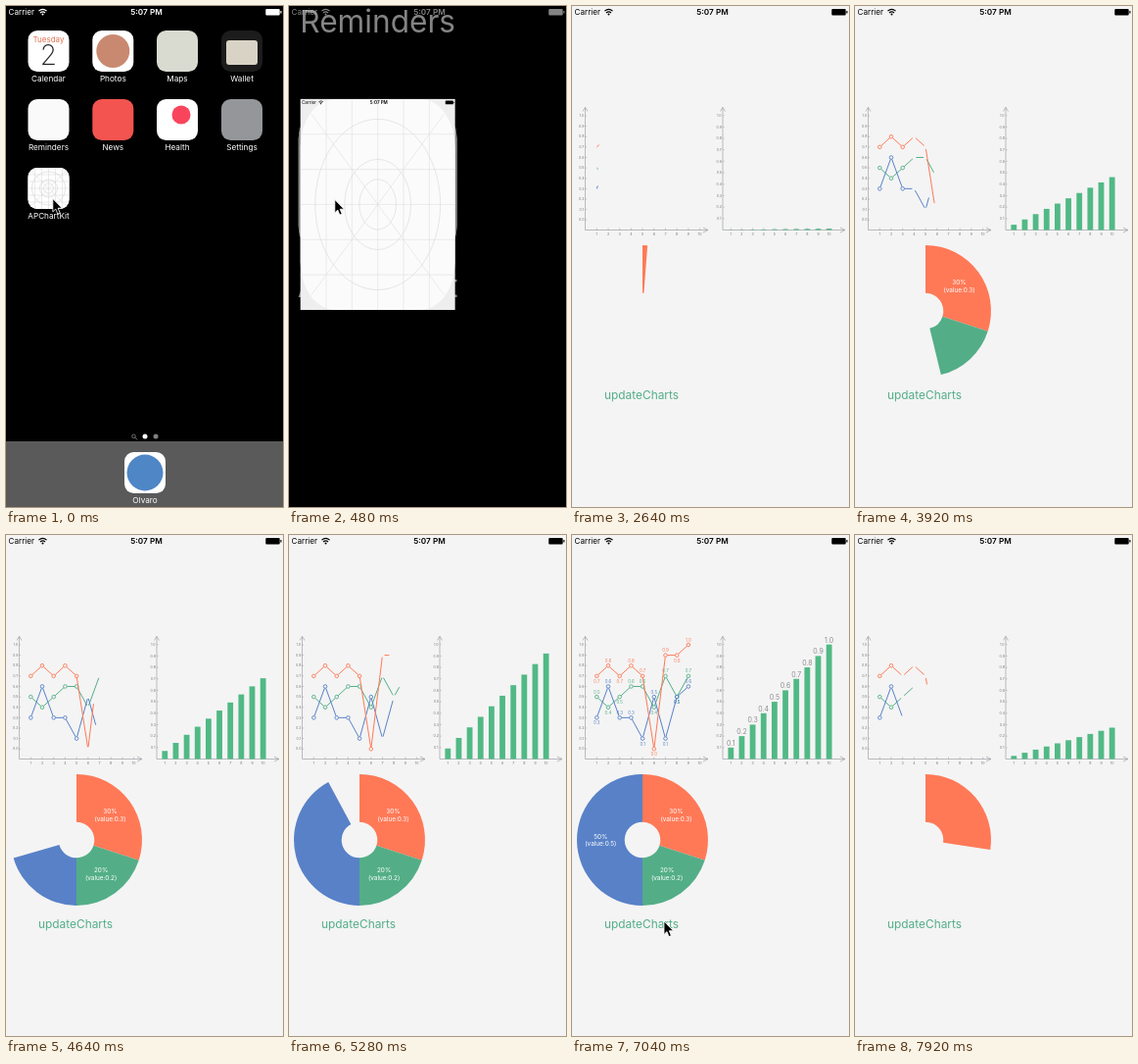
These frames come from a looping animation (283 by 511 pixels, 8 s). An HTML page:

```html
<!DOCTYPE html>
<html lang="en">
<head>
<meta charset="utf-8">
<title>Chart demo</title>
<style>
html, body { margin: 0; width: 100%; height: 100%; overflow: hidden; background: #000; }
svg { display: block; width: 283px; height: 511px; }
text { font-family: Inter, Roboto, sans-serif; }
</style>
</head>
<body>
<svg id="stage" viewBox="0 0 283 511"></svg>
<script>
const LOOP = 8000;
const ORANGE = '#ff7957', GREEN = '#53ae87', BLUE = '#5881c8', BAR = '#51b985', BG = '#f4f4f4';
const stage = document.getElementById('stage');

function el(tag, attrs, parent, content) {
  const node = document.createElementNS('http://www.w3.org/2000/svg', tag);
  set(node, attrs);
  if (content !== undefined) node.textContent = content;
  parent.appendChild(node);
  return node;
}
function set(node, attrs) {
  for (const k in attrs) node.setAttribute(k, attrs[k]);
}
const group = parent => el('g', {}, parent);
const label = (parent, x, y, size, fill, str, more = {}) =>
  el('text', { x, y, 'font-size': size, fill, 'text-anchor': 'middle', ...more }, parent, str);
const rect = (parent, x, y, width, height, fill, rx = 0) =>
  el('rect', { x, y, width, height, fill, rx }, parent);
const dot = (parent, cx, cy, r, fill) => el('circle', { cx, cy, r, fill }, parent);
const line = (parent, d, stroke, width = 0.6) =>
  el('path', { d, stroke, fill: 'none', 'stroke-width': width }, parent);

function statusBar(parent, color) {
  const g = group(parent);
  label(g, 2.5, 9, 8.1, color, 'Carrier', { 'text-anchor': 'start' });
  line(g, 'M33.4 5.2Q37.5 1.4 41.6 5.2M35 7Q37.5 4.7 40 7', color, 1.1);
  dot(g, 37.5, 8.6, 1, color);
  label(g, 143.5, 9, 8.2, color, '5:07 PM', { 'font-weight': 600 });
  rect(g, 265.3, 3, 14.4, 6.6, color, 1);
  rect(g, 280.3, 5, 1.2, 2.6, color, 0.5);
  return g;
}

// 42 x 42 template icon with construction lines
function gridIcon(parent) {
  const g = group(parent);
  rect(g, 0, 0, 42, 42, '#fff', 9.5);
  let d = 'M3 3L39 39M39 3L3 39';
  for (const v of [7, 14, 21, 28, 35]) d += `M${v} 0V42M0 ${v}H42`;
  set(line(g, d, '#dcdcdc'), { 'vector-effect': 'non-scaling-stroke' });
  for (const r of [5, 9, 17]) {
    el('circle', { cx: 21, cy: 21, r, fill: 'none', stroke: '#d2d2d2', 'stroke-width': 0.6,
      'vector-effect': 'non-scaling-stroke' }, g);
  }
  return g;
}

// Home screen
rect(stage, 0, 0, 283, 511, '#000');
const home = group(stage);
const homeBar = statusBar(stage, '#fff');
rect(home, 0, 444, 283, 67, '#5a5a5a');

function app(x, y, name, fill) {
  const g = group(home);
  rect(g, x, y, 42, 42, fill, 9.5);
  label(home, x + 21, y + 51.5, 8.2, '#fff', name);
  return g;
}
const COLS = [22.5, 88.3, 154, 220];
const calendar = app(COLS[0], 25, 'Calendar', '#fff');
label(calendar, 43.5, 36.5, 8, '#e0714f', 'Tuesday');
label(calendar, 43.5, 60, 28, '#222', '2', { 'font-weight': 200 });
dot(app(COLS[1], 25, 'Photos', '#fff'), 109.3, 46, 17, '#c98970');
app(COLS[2], 25, 'Maps', '#d9dbd0');
const wallet = app(COLS[3], 25, 'Wallet', '#1c1c1c');
rect(wallet, 225, 35, 32, 25, '#d8d3c4', 3);
app(COLS[0], 95, 'Reminders', '#fafafa');
app(COLS[1], 95, 'News', '#f3544f');
dot(app(COLS[2], 95, 'Health', '#fff'), 179, 111, 9.5, '#f9455c');
app(COLS[3], 95, 'Settings', '#94969a');
const launcher = app(COLS[0], 165, 'APChartKit', '#fff');
set(gridIcon(launcher), { transform: 'translate(22.5 165)' });
dot(app(121, 455, 'Olvaro', '#fff'), 142, 476, 18.5, '#4f86c6');
el('circle', { cx: 130.5, cy: 438.8, r: 1.8, fill: 'none', stroke: '#8a8a8a', 'stroke-width': 0.8 }, home);
line(home, 'M131.8 440.1L134 442.3', '#8a8a8a', 0.9);
dot(home, 142, 439, 2.5, '#fff');
dot(home, 153, 439, 2.5, '#808080');

// Launching window
const win = group(stage);
const winBg = rect(win, 0, 0, 42, 42, BG);
const winIcon = gridIcon(win);
const winBar = statusBar(win, '#000');

// Chart view
const view = group(stage);
label(view, 33, 400.5, 11.9, GREEN, 'updateCharts', { 'text-anchor': 'start' });

const BASE = 228.5;
const lineX = i => 25.3 + i * 11.7;
const lineY = v => 218.2 - v * 106.2;
const barX = i => 162.3 + i * 11.15;

function axes(x0, x1, xAt, steps, yAt) {
  line(view, `M${x0} ${BASE}V103.5M${x0 - 2.5} 107.5L${x0} 103.3L${x0 + 2.5} 107.5` +
    `M${x0} ${BASE}H${x1}M${x1 - 5} ${BASE - 2.5}L${x1} ${BASE}L${x1 - 5} ${BASE + 2.5}`, '#a2a2a8', 0.7);
  for (let i = 0; i < 10; i++) {
    line(view, `M${xAt(i)} ${BASE}v-2`, '#a2a2a8');
    label(view, xAt(i), 234.3, 3.6, '#77777d', i + 1);
  }
  for (const v of steps) {
    label(view, x0 - 3.7, yAt(v) + 1.2, 3.6, '#77777d', v.toFixed(1));
    line(view, `M${x0} ${yAt(v)}h1.5`, '#a2a2a8');
  }
}
const tenths = Array.from({ length: 11 }, (_, i) => i / 10);
axes(13.5, 139, lineX, tenths, lineY);
axes(154, 279, barX, tenths.slice(1), v => BASE - v * 116.8);

const series = [
  [GREEN, [5, 4, 5, 6, 6, 4, 7, 5, 7]],
  [BLUE, [3, 6, 3, 3, 1, 5, 1, 5, 6]],
  [ORANGE, [7, 8, 7, 8, 7, 0, 9, 9, 10]]
].map(([color, vals]) => {
  const pts = vals.map((v, i) => [lineX(i), lineY(v / 10)]);
  const path = line(view, '', color, 1);
  const rings = pts.map(([cx, cy]) =>
    el('circle', { cx, cy, r: 1.8, fill: 'none', stroke: color, 'stroke-width': 0.9 }, view));
  const tags = group(view);
  pts.forEach(([x, y], i) => {
    const rising = vals[i + 1] > vals[i];
    label(tags, x, y + (rising ? 7 : -3.5), 4.4, color, (vals[i] / 10).toFixed(1));
  });
  const lens = pts.slice(1).map((p, i) => Math.hypot(p[0] - pts[i][0], p[1] - pts[i][1]));
  return { pts, path, rings, tags, lens, total: lens.reduce((a, b) => a + b) };
});

const barTags = group(view);
const bars = tenths.slice(1).map((v, i) => {
  label(barTags, barX(i), BASE - v * 116.8 - 2, 7, '#8c8c92', v.toFixed(1));
  return rect(view, barX(i) - 2.9, BASE, 5.8, 0, BAR);
});

const CX = 72, CY = 311, R = 67, HOLE = 18.3;
const polar = (r, f) => {
  const a = f * 2 * Math.PI;
  return `${CX + r * Math.sin(a)} ${CY - r * Math.cos(a)}`;
};
const slices = [[ORANGE, 0, 0.3], [GREEN, 0.3, 0.5], [BLUE, 0.5, 1]].map(([color, from, to]) => {
  const path = el('path', { fill: color }, view);
  const tag = group(view);
  const [x, y] = polar((R + HOLE) / 2, (from + to) / 2).split(' ').map(Number);
  const share = to - from;
  label(tag, x, y - 1.5, 6.4, '#fff', Math.round(share * 100) + '%');
  label(tag, x, y + 6, 6.4, '#fff', `(value:${share.toFixed(1)})`);
  return { path, tag, from, to };
});

const cursor = el('path', { d: 'M0 0V13.4L3 10.6L5 15.6L7.4 14.6L5.3 9.7H9.5Z',
  fill: '#000', stroke: '#fff', 'stroke-width': 0.8 }, stage);

const clamp = v => Math.max(0, Math.min(1, v));
const ramp = (t, a, b) => clamp((t - a) / (b - a));
const smooth = u => u * u * (3 - 2 * u);
const mix = (a, b, u) => a + (b - a) * u;
const show = (node, on) => set(node, { opacity: +on });

function track(keys, t) {
  if (t <= keys[0][0]) return keys[0].slice(1);
  for (let i = 1; i < keys.length; i++) {
    const a = keys[i - 1], b = keys[i];
    if (t < b[0]) return a.slice(1).map((v, k) => mix(v, b[k + 1], (t - a[0]) / (b[0] - a[0])));
  }
  return keys[keys.length - 1].slice(1);
}

const RUN = [[2605, 0], [2640, 0.0119], [3920, 0.4617], [5280, 0.921], [5515, 1], [6105, 1.21]];
const RERUN = [[7140, 0], [7920, 0.2736], [8000, 0.301]];
const POINTER = [[0, 47.8, 196.5], [400, 46.8, 197.5], [6400, 100, 409], [6850, 94, 394], [7250, 94, 394], [7480, 96, 402]];

function drawLaunch(t) {
  const q = smooth(ramp(t, 130, 850));
  const s = mix(1, 6.74, q) * (1 + 0.1 * q * (1 - q));
  const cx = mix(43.5, 141.5, q), cy = mix(186, 173, q);
  set(home, { transform: `translate(${cx} ${cy}) scale(${s}) translate(-43.5 -186)`, opacity: 1 - q });
  set(homeBar, { opacity: 1 - q });
  const x = mix(22.5, 0, q), w = mix(42, 283, q);
  const top = mix(165, 0, q ** 1.17), h = mix(207, 511, q ** 1.48) - top;
  show(win, q > 0);
  set(winBg, { x, y: top, width: w, height: h, opacity: clamp(q * 4), fill: q < 1 ? '#eeeeee' : BG });
  set(winIcon, { transform: `translate(${x} ${top}) scale(${w / 42} ${h / 42})`, opacity: 1 - q * q });
  set(winBar, { transform: `translate(${x} ${top}) scale(${w / 283})`, opacity: clamp(q * 4) });
}

function drawLines(p) {
  for (const s of series) {
    let left = s.total * clamp(p), d = '';
    s.lens.forEach((len, i) => {
      const end = Math.min(left, len - 2);
      const start = p < 0.05 ? 0 : 2;
      if (end > start) {
        const [a, b] = [s.pts[i], s.pts[i + 1]];
        const at = k => `${mix(a[0], b[0], k / len)} ${mix(a[1], b[1], k / len)}`;
        d += `M${at(start)}L${at(end)}`;
      }
      left -= len;
    });
    set(s.path, { d });
    s.rings.forEach((ring, i) => show(ring, p >= (i + 1) / 7.5));
    show(s.tags, p >= 1);
  }
}

function drawBars(p) {
  bars.forEach((bar, i) => {
    const height = tenths[i + 1] * 116.8 * clamp(p);
    set(bar, { y: BASE - height, height });
  });
  show(barTags, p >= 1);
}

function drawPie(p) {
  for (const { path, tag, from, to } of slices) {
    const end = Math.min(clamp(p), to);
    const big = end - from > 0.5 ? 1 : 0;
    set(path, { d: end > from
      ? `M${polar(HOLE, from)}L${polar(R, from)}A${R} ${R} 0 ${big} 1 ${polar(R, end)}` +
        `L${polar(HOLE, end)}A${HOLE} ${HOLE} 0 ${big} 0 ${polar(HOLE, from)}Z`
      : '' });
    show(tag, p >= to);
  }
}

function draw(t) {
  drawLaunch(t);
  set(view, { opacity: ramp(t, 1650, 2000) });
  const [p] = track(t < RERUN[0][0] ? RUN : RERUN, t);
  drawLines(p);
  drawBars(p);
  drawPie(p);
  const [x, y] = track(t < 1000 ? POINTER.slice(0, 2) : POINTER.slice(2), t);
  set(cursor, { transform: `translate(${x} ${y})` });
  show(cursor, t < 1000 || (t > 6400 && t < 7560));
}

const begin = performance.now();
function tick() {
  draw((performance.now() - begin) % LOOP);
  requestAnimationFrame(tick);
}
tick();
</script>
</body>
</html>
```
